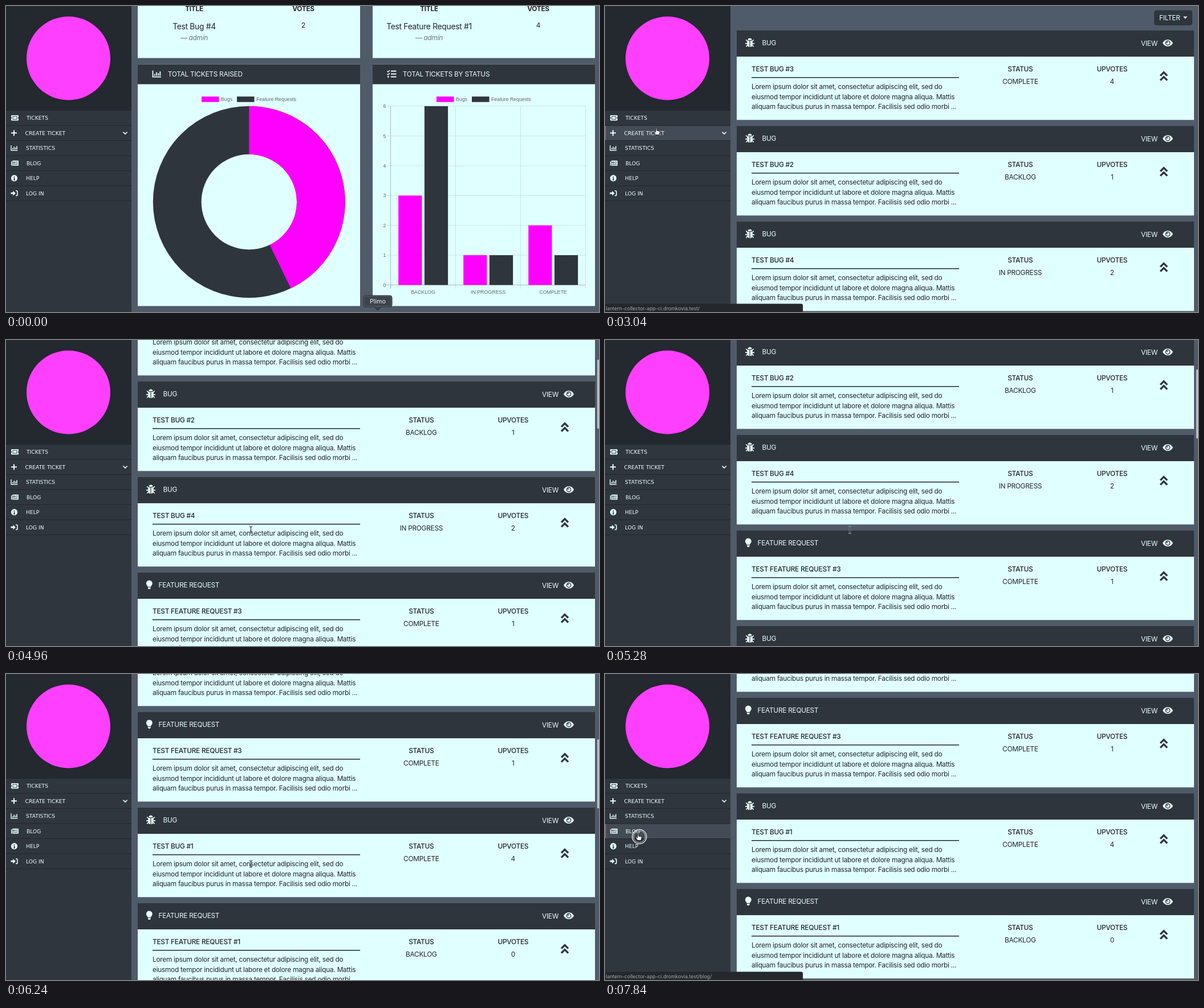
An HTML page that plays this animation: 1040 px wide and 538 px high, repeating every 8 s.

```html
<!DOCTYPE html>
<html lang="en">
<head>
<meta charset="utf-8">
<title>Ticket dashboard</title>
<style>
html, body { margin: 0; width: 100%; height: 100%; overflow: hidden; background: #505b69 }
svg { display: block; width: 100vw; height: 100vh }
text { font: 11.8px Inter, sans-serif; letter-spacing: -.02em; fill: #212529; white-space: pre }
.mid { text-anchor: middle }
.end { text-anchor: end }
.light { fill: #e8ffff }
.medium { font-weight: 500 }
.bold { font-weight: 700 }
.big { font-size: 13.8px }
.quote { font-style: italic; fill: #6c757d }
.menu { font: 9.2px "DejaVu Sans", sans-serif; letter-spacing: 0; fill: #f0ffff }
.chart { font: 8.8px "Liberation Sans", Arial, sans-serif; letter-spacing: 0; fill: #666 }
.tip { font-size: 10.8px; letter-spacing: 0; fill: #f2f4f5 }
.url { font-size: 8.7px; letter-spacing: 0; fill: #a3a8ac }
.line { fill: none; stroke: currentColor }
</style>
</head>
<body>
<svg id="stage" viewBox="0 0 1040 538"></svg>
<script>
const LOOP = 8000, STEP = 160;
const PINK = '#ff00ff', DARK = '#2f353c', CYAN = '#e0ffff', LIGHT = '#e8ffff';

const text = (x, y, s, cls = '') => `<text x="${x}" y="${y}" class="${cls}">${s}</text>`;
const rect = (x, y, w, h, fill, more = '') =>
  `<rect x="${x}" y="${y}" width="${w}" height="${h}" fill="${fill}" ${more}/>`;
const fill = d => `<path d="${d}" fill="currentColor"/>`;
const line = (d, w) => `<path d="${d}" class="line" stroke-width="${w}"/>`;
const dot = (x, y, r, c) => `<circle cx="${x}" cy="${y}" r="${r}" fill="${c}"/>`;

// Icons are drawn around their own centre
const icons = {
  ticket: rect(-6.5, -4.7, 13, 9.4, 'currentColor', 'rx="1.3"') + rect(-3.6, -2.5, 7.2, 5, 'none', `stroke="${DARK}"`)
    + dot(-6.6, 0, 1.2, DARK) + dot(6.6, 0, 1.2, DARK),
  plus: line('M-5 0H5M0-5V5', 2),
  bars: line('M-7-6V5.2H7.5', 1.8) + line('M-3.6 3V0M-.4 3v-6M2.8 3v-4.2M5.8 3v-7.5', 1.9),
  news: rect(-4.5, -4.5, 11, 9, 'currentColor', 'rx="1"') + fill('M-6.5-3h2v7.5q-2 0-2-1.5z')
    + `<path d="M-4.5-3V4M-2.8-2H.6V0H-2.8ZM2-2.2H5M2 0H5M-3 2.4H5" fill="none" stroke="${DARK}" stroke-width=".9"/>`,
  info: dot(0, 0, 5.6, 'currentColor')
    + `<path d="M0-3.4V-1.9M-1.2-.6H.2V3M-1.4 3H1.5" fill="none" stroke="${DARK}" stroke-width="1.4"/>`,
  login: fill('M-6-1.4H-2V-4.2L2.4 0-2 4.2V1.4H-6z') + line('M2.5-4.2H4.4Q5.5-4.2 5.5-3V3Q5.5 4.2 4.4 4.2H2.5', 1.6),
  tasks: line('M-1.5-5H8M-1.5 0H8M-1.5 5H8', 2) + line('M-8-5l1.6 1.5 2.7-3M-8 0l1.6 1.5 2.7-3', 1.5)
    + dot(-6.2, 5, 1.4, 'currentColor'),
  bug: fill('M-3.5-4.5a3.5 3.5 0 0 1 7 0zM-4.7-3.5H-.6V7.7C-3.2 7.4-4.7 5.4-4.7 3zM4.7-3.5H.6V7.7C3.2 7.4 4.7 5.4 4.7 3z')
    + line('M-4-2.3-6.8-5M4-2.3 6.8-5M-4 1.3H-8M4 1.3H8M-4 4-6.6 7M4 4 6.6 7', 1.7),
  bulb: fill('M0-8a5.4 5.4 0 0 1 4 9Q2.8 2.3 2.7 3.6H-2.7Q-2.8 2.3-4 1A5.4 5.4 0 0 1 0-8zM-2.7 4.4h5.4l-1.2 3h-3z'),
  eye: fill('M-9 0C-5-8 5-8 9 0 5 8-5 8-9 0Z') + dot(0, 0, 4.4, DARK) + dot(0, 0, 3, 'currentColor')
    + dot(-1.3, -1.3, 1.2, DARK),
  up: line('M-6-.7 0-6.7 6-.7M-6 7.3 0 1.3 6 7.3', 3.4),
  down: line('M-3.6-1.8 0 1.8 3.6-1.8', 1.7)
};
const icon = (name, x, y, size = 1, color = LIGHT) =>
  `<g transform="translate(${x} ${y}) scale(${size})" color="${color}">${icons[name]}</g>`;

const ROW_TOP = 183.5, ROW = 26.5;
const menu = [
  ['TICKETS', 36, 'ticket', 15.5, 1, 'tickets/'],
  ['CREATE TICKET', 33.5, 'plus', 14, 1, ''],
  ['STATISTICS', 35, 'bars', 14.5, .78, 'statistics/'],
  ['BLOG', 36, 'news', 15.5, 1, 'blog/'],
  ['HELP', 35, 'info', 14.5, 1, 'help/'],
  ['LOG IN', 35, 'login', 14.5, 1, 'login/']
];

function sidebar() {
  let s = rect(0, 0, 220, 538, '#2f363e') + rect(0, 0, 220, 183.5, '#24282f') + dot(109.5, 92, 73.5, '#ff3fff');
  s += `<g id="hover">${rect(0, 0, 220, 26, '#434b56')}${rect(0, 0, 1.6, 26, '#d42bdc')}</g>`;
  menu.forEach(([label, x, name, ix, size], i) => {
    const y = ROW_TOP + i * ROW;
    s += rect(0, y + ROW - .5, 220, 1, '#22272d') + icon(name, ix, y + 13.2, size) + text(x, y + 16.7, label, 'menu');
  });
  return s + rect(0, 183, 220, 1, '#22272d') + icon('down', 209, 223.3);
}

function panel(x, name, title, ticket, votes) {
  const mid = x + 99, right = x + 290.5;
  return rect(x, -5, 390, 96.5, CYAN) + rect(x, 102.5, 390, 425, CYAN) + rect(x, 102.5, 390, 35, DARK)
    + text(mid, 9, 'TITLE', 'mid bold') + text(right, 9, 'VOTES', 'mid bold')
    + text(mid, 41, ticket, 'mid big') + text(mid, 60.3, '— admin', 'mid quote') + text(right, 38, votes, 'mid')
    + icon(name, x + 33.5, 119.5) + text(x + 52.8, 124.3, title, 'light')
    + rect(x + 112, 159.2, 30.5, 9.6, PINK) + text(x + 146, 167, 'Bugs', 'chart')
    + rect(x + 174, 159.2, 30.5, 9.6, DARK) + text(x + 208, 167, 'Feature Requests', 'chart');
}

function donut(cx, cy, R, r, share) {
  const a = share * 2 * Math.PI, at = q => `${cx + q * Math.sin(a)} ${cy - q * Math.cos(a)}`;
  return `<circle cx="${cx}" cy="${cy}" r="${(R + r) / 2}" fill="none" stroke="${DARK}" stroke-width="${R - r}"/>`
    + `<path fill="${PINK}" d="M${cx} ${cy - R}A${R} ${R} 0 0 1 ${at(R)}L${at(r)}A${r} ${r} 0 0 0 ${cx} ${cy - r}Z"/>`;
}

function barChart() {
  const base = 490.5, unit = 52.4, left = 674.5, group = 114;
  let s = '';
  for (let v = 0; v <= 6; v++) {
    const y = base - v * unit;
    s += rect(667, y - .5, 349.5, 1, `rgba(0,0,0,${v ? .1 : .25})`) + text(666.5, y + 3, v, 'chart end');
  }
  for (let i = 0; i < 4; i++)
    s += rect(left - .5 + i * group, 176, 1, 321, `rgba(0,0,0,${i ? .1 : .25})`);
  [['BACKLOG', 3, 6], ['IN PROGRESS', 1, 1], ['COMPLETE', 2, 1]].forEach(([label, bugs, features], i) => {
    const x = left + i * group;
    s += rect(x + 13.7, base - bugs * unit, 41.2, bugs * unit, PINK)
      + rect(x + 59.4, base - features * unit, 41.2, features * unit, DARK)
      + text(x + 57, 506, label, 'chart mid');
  });
  return s;
}

function card([kind, no, status, votes], i) {
  const bug = kind === 'BUG', y = 43 + i * 168;
  const body = ['Lorem ipsum dolor sit amet, consectetur adipiscing elit, sed do',
    'eiusmod tempor incididunt ut labore et dolore magna aliqua. Mattis',
    'aliquam faucibus purus in massa tempor. Facilisis sed odio morbi ...'];
  return `<g transform="translate(0 ${y})">`
    + rect(231, 0, 802, 157.3, CYAN) + rect(231, 0, 802, 46, DARK)
    + (bug ? icon('bug', 254, 21.5) : icon('bulb', 251.3, 21.5))
    + text(bug ? 275.5 : 267.5, 26.2, kind, 'light') + text(940, 27.3, 'VIEW', 'light') + icon('eye', 987, 22)
    + text(257, 72, `TEST ${kind} #${no}`, 'medium') + rect(257, 82, 364, 1.5, '#23292f')
    + body.map((s, n) => text(257, 103 + n * 17.7, s)).join('')
    + text(728.3, 72, 'STATUS', 'mid medium') + text(728.3, 94, status, 'mid')
    + text(889.3, 72, 'UPVOTES', 'mid medium') + text(889.3, 94, votes, 'mid')
    + icon('up', 980, 80.3, 1, DARK) + '</g>';
}

const stats = panel(231, 'bars', 'TOTAL TICKETS RAISED', 'Test Bug #4', 2)
  + panel(643, 'tasks', 'TOTAL TICKETS BY STATUS', 'Test Feature Request #1', 4)
  + donut(426.3, 344.5, 168.5, 83.7, 3 / 7) + barChart();

const list = rect(963, 7.5, 67, 26.5, DARK, 'rx="4"') + text(972, 25, 'FILTER', 'light')
  + `<path d="M1014 18.6h7.4l-3.7 4z" fill="${LIGHT}"/>`
  + [['BUG', 3, 'COMPLETE', 4], ['BUG', 2, 'BACKLOG', 1], ['BUG', 4, 'IN PROGRESS', 2],
    ['FEATURE REQUEST', 3, 'COMPLETE', 1], ['BUG', 1, 'COMPLETE', 4],
    ['FEATURE REQUEST', 1, 'BACKLOG', 0]].map(card).join('');

const tip = `<path d="M631 509H673Q677 509 677 513V525Q677 529 673 529H658L652 535 646 529H631Q627 529 627 525V513Q627 509 631 509Z"
  fill="#3c434b" stroke="#22272c"/>` + rect(628, 510, 48, 18, 'none', 'rx="3" stroke="#6d747b" stroke-width=".7"')
  + text(652, 522.6, 'Plimo', 'tip mid');

// Pointers have their hot spot at the origin
const pointers = `<path id="arrow" d="M0 0V10.6L2.5 8.4 4.3 12.4 6.1 11.6 4.4 7.7H7.8Z" fill="#111" stroke="#e6e6e6" stroke-width=".9"/>
  <g id="beam" fill="none"><path d="M-2.5-6Q0-6 0-4V4Q0 6-2.5 6M2.5-6Q0-6 0-4V4Q0 6 2.5 6M-1.5 2H1.5" stroke="#c5cbd0" stroke-width="1.8"/>
  <path d="M-2.5-6Q0-6 0-4V4Q0 6-2.5 6M2.5-6Q0-6 0-4V4Q0 6 2.5 6M-1.5 2H1.5" stroke="#222" stroke-width=".9"/></g>
  <path id="hand" d="M-1 0Q0-1 1 0V4L5 4.8Q6.6 5.2 6.3 7L5.2 11.5H-.8L-4 7Q-4.2 5.4-2.6 5.8L-1 7.2Z"
    fill="#fff" stroke="#111" stroke-width=".9"/>
  <g id="ring" fill="none" stroke="#f2f2f2"><circle cx="2.3" cy="5" r="12.6" stroke-width="1.3"/>
  <circle cx="2.3" cy="5" r="10.4" stroke-width=".8"/></g>`;

document.getElementById('stage').innerHTML = rect(0, 0, 1040, 538, '#505b69')
  + `<g id="stats">${stats}</g><g id="list">${list}</g>`
  + rect(1036.8, 2, 4, 121.5, '#bcc1c7', 'rx="2" id="thumb"') + sidebar()
  + `<g id="status"><path d="M0 523.5H344Q347 523.5 347 526.5V538H0Z" fill="#24282d"/>${text(1.5, 534.5, '', 'url')}</g>`
  + `<g id="tip">${tip}</g><g id="cursor">${pointers}</g>`;

const el = id => document.getElementById(id);
const show = (id, on) => el(id).style.display = on ? '' : 'none';
const move = (id, x, y) => el(id).setAttribute('transform', `translate(${x} ${y})`);

// Each key is [time, ...values], joined by straight segments
function track(keys, t) {
  const i = keys.findIndex(k => k[0] > t);
  if (i < 1) return keys[i ? keys.length - 1 : 0].slice(1);
  const [a, b] = [keys[i - 1], keys[i]], p = (t - a[0]) / (b[0] - a[0]);
  return a.slice(1).map((v, n) => v + (b[n + 1] - v) * p);
}

const path = [[0, 652, 560], [320, 640, 520], [800, 400, 400], [1280, 150, 250], [1600, 70, 212], [1920, 50, 201],
  [2400, 52, 200], [2880, 52, 200], [3040, 90, 215], [3360, 395, 320], [3680, 395, 320], [4000, 429.5, 334],
  [6240, 429.5, 334], [6400, 350, 328], [6560, 197.5, 314.5], [6880, 80, 291], [7680, 58, 281]];
const scroll = [[4480, 0], [4640, 32], [4960, 138], [5280, 212], [5600, 246], [5920, 338],
  [6080, 420], [6240, 480], [6400, 505]];

function draw(t) {
  const [x, y] = track(path, t), [top] = track(scroll, t);
  const linked = x < 220 && (t >= 2080 && t < 4480 || t >= 6720);
  const row = linked ? Math.floor((y - ROW_TOP) / ROW) : -1;
  const beam = t >= 3360 && t < 6720;

  show('stats', t < 3040);
  show('list', t >= 3040);
  move('list', 0, -top);
  show('thumb', t >= 4480 && t < 7040);
  move('thumb', 0, top * .235);
  show('tip', t < 320);

  show('hover', linked);
  move('hover', 0, ROW_TOP + row * ROW + .5);
  show('status', linked);
  if (linked)
    el('status').lastChild.textContent = 'lantern-collector-app-ci.dromkovia.test/' + menu[row][5];

  move('cursor', x, y);
  show('arrow', !linked && !beam);
  show('beam', beam);
  show('hand', linked);
  show('ring', t >= 2560 && t < 3040 || t >= 7840);
}

const start = performance.now();
function tick() {
  const t = (performance.now() - start) % LOOP;
  draw(Math.floor(t / STEP) * STEP);
  requestAnimationFrame(tick);
}
tick();
</script>
</body>
</html>
```
